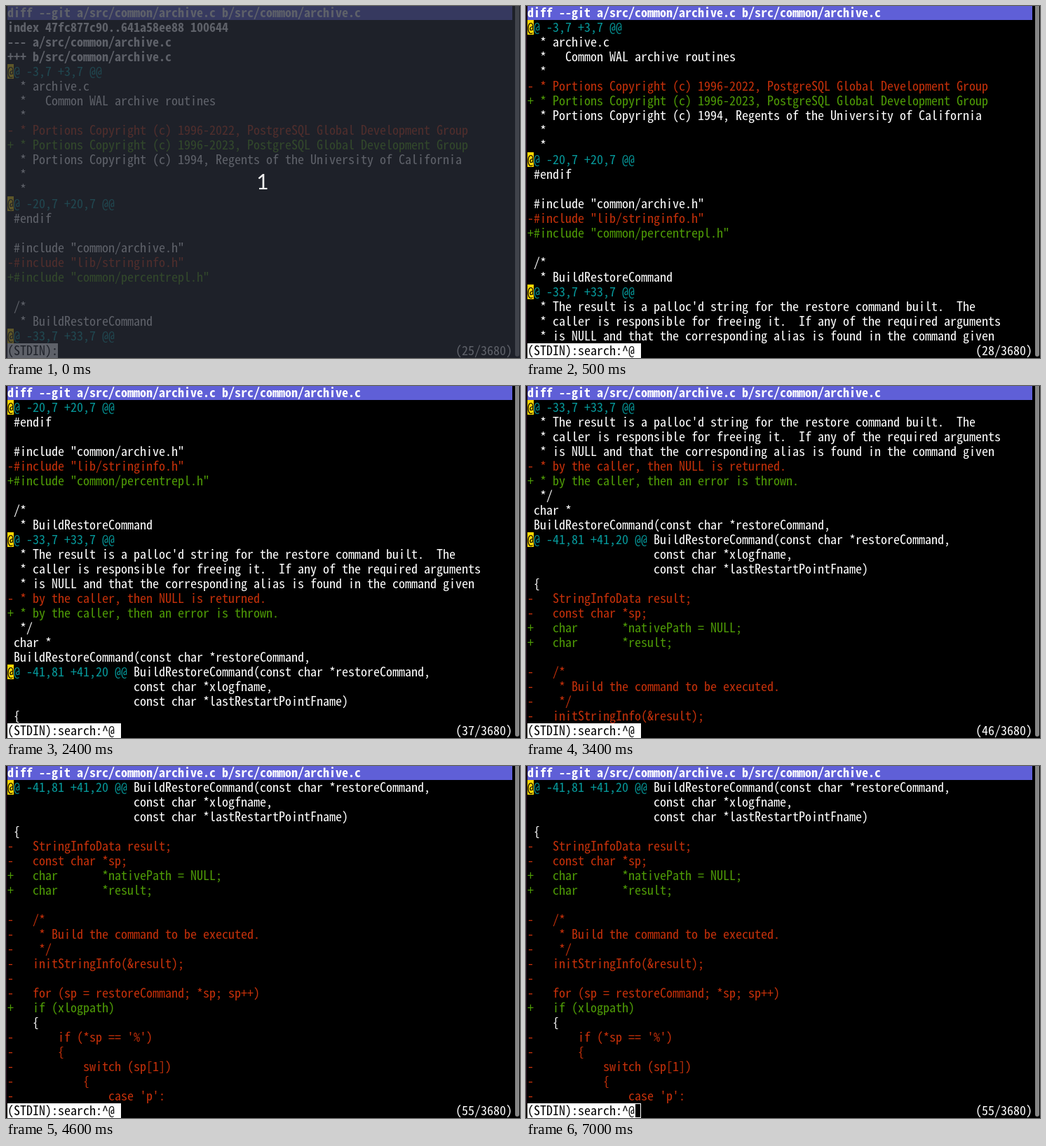
Write an HTML page that moves like this. It is 733 px wide and 503 px high and loops after 7.1 s.

```html
<!DOCTYPE html>
<html lang="en">
<head>
<meta charset="utf-8">
<title>Diff pager</title>
<style>
  html, body { margin: 0; width: 100%; height: 100%; overflow: hidden; background: #000; }
  svg { display: block; width: 733px; height: 503px; }
  text {
    font-family: "Noto Sans Mono CJK JP", "Noto Sans Mono", "DejaVu Sans Mono", monospace;
    white-space: pre;
    font-kerning: none;
    font-variant-ligatures: none;
  }
  .count { font: 30px Lato, "Open Sans", sans-serif; text-anchor: middle; }
</style>
</head>
<body>
<svg id="stage" viewBox="0 0 733 503"></svg>
<script>
const LOOP = 7100, CELL = 9, ROW = 21, LEFT = 2, COLS = 80, ROWS = 22;
const WHITE = "#fff", RED = "#c4300a", GREEN = "#4e9a06", CYAN = "#06989a";
const stage = document.getElementById("stage");

const HEADER = "diff --git a/src/common/archive.c b/src/common/archive.c";
const LINES = `index 47fc877c90..641a58ee88 100644
--- a/src/common/archive.c
+++ b/src/common/archive.c
@@ -3,7 +3,7 @@
  * archive.c
  *   Common WAL archive routines
  *
- * Portions Copyright (c) 1996-2022, PostgreSQL Global Development Group
+ * Portions Copyright (c) 1996-2023, PostgreSQL Global Development Group
  * Portions Copyright (c) 1994, Regents of the University of California
  *
  *
@@ -20,7 +20,7 @@
 #endif

 #include "common/archive.h"
-#include "lib/stringinfo.h"
+#include "common/percentrepl.h"

 /*
  * BuildRestoreCommand
@@ -33,7 +33,7 @@
  * The result is a palloc'd string for the restore command built.  The
  * caller is responsible for freeing it.  If any of the required arguments
  * is NULL and that the corresponding alias is found in the command given
- * by the caller, then NULL is returned.
+ * by the caller, then an error is thrown.
  */
 char *
 BuildRestoreCommand(const char *restoreCommand,
@@ -41,81 +41,20 @@ BuildRestoreCommand(const char *restoreCommand,
                    const char *xlogfname,
                    const char *lastRestartPointFname)
 {
-   StringInfoData result;
-   const char *sp;
+   char       *nativePath = NULL;
+   char       *result;

-   /*
-    * Build the command to be executed.
-    */
-   initStringInfo(&result);
-
-   for (sp = restoreCommand; *sp; sp++)
+   if (xlogpath)
    {
-       if (*sp == '%')
-       {
-           switch (sp[1])
-           {
-               case 'p':`.split("\n");

// [start ms, first line, cursor, countdown]
const STEPS = [
  [0, 0, "off", "1"],
  [100, 0, "off"],
  [500, 3, "on"],
  [1100, 3, "off"],
  [1700, 3, "on"],
  [2400, 12, "on"],
  [2900, 12, "off"],
  [3400, 21, "on"],
  [4000, 21, "off"],
  [4600, 30, "on"],
  [5200, 30, "off"],
  [5800, 30, "on"],
  [6400, 30, "off"],
  [6900, 30, "hollow"]
];

function add(tag, attrs, content = "") {
  const node = document.createElementNS("http://www.w3.org/2000/svg", tag);
  for (const key in attrs) node.setAttribute(key, attrs[key]);
  node.textContent = content;
  stage.append(node);
}

function rect(x, y, width, height, fill, more = {}) {
  add("rect", { x, y, width, height, fill, ...more });
}

// Choose the size at which one character fills one cell.
function cellFontSize() {
  const pen = document.createElement("canvas").getContext("2d");
  pen.font = "100px " + getComputedStyle(probe).fontFamily;
  return CELL * 100 / pen.measureText("0").width;
}
add("text", {});
const probe = stage.firstChild;
const fontSize = cellFontSize();

const colX = col => LEFT + col * CELL;
const rowY = row => row * ROW - 1;

function print(row, col, content, fill, weight = 400) {
  add("text", {
    x: colX(col), y: rowY(row) + 17, fill,
    "font-size": fontSize, "font-weight": weight
  }, content);
}

function block(row, col, count, fill) {
  rect(colX(col), rowY(row), count * CELL, ROW, fill);
}

function printLine(row, line) {
  if (line.startsWith("@@")) {
    const end = line.lastIndexOf("@@") + 2;
    block(row, 0, 1, "#ffd700");
    print(row, 0, "@", "#000");
    print(row, 1, line.slice(1, end), CYAN);
    print(row, end, line.slice(end), WHITE);
  } else if (/^(index|---|\+\+\+) /.test(line)) {
    print(row, 0, line, WHITE, 700);
  } else {
    print(row, 0, line, { "-": RED, "+": GREEN }[line[0]] || WHITE);
  }
}

function printStatus(first, cursor) {
  const row = ROWS + 1;
  const prompt = first ? "(STDIN):search:^@" : "(STDIN):";
  const position = `(${25 + first}/3680)`;
  block(row, 0, prompt.length, WHITE);
  print(row, 0, prompt, "#000");
  print(row, COLS - position.length, position, WHITE);
  if (cursor === "on") block(row, prompt.length, 1, WHITE);
  if (cursor === "hollow") {
    rect(colX(prompt.length) + .5, rowY(row) + .5, CELL - 1, ROW - 1, "none", { stroke: WHITE });
  }
}

function draw([, first, cursor, countdown]) {
  stage.replaceChildren();
  rect(0, 0, 733, 503, "#000");
  rect(0, 0, 1, 503, "#2c0f24");
  rect(726, -8, 6, 509, "#868686", { rx: 3 });
  block(0, 0, COLS, "#5f5fd7");
  print(0, 0, HEADER, WHITE, 700);
  LINES.slice(first, first + ROWS).forEach((line, i) => printLine(i + 1, line));
  printStatus(first, cursor);
  if (countdown) {
    rect(0, 0, 733, 503, "rgba(41,45,55,.75)");
    add("text", { class: "count", x: 366, y: 262, fill: "#eee" }, countdown);
  }
}

let shown;
const origin = performance.now();
function tick() {
  const time = (performance.now() - origin) % LOOP;
  const step = STEPS.findLast(([start]) => start <= time);
  if (step !== shown) draw(shown = step);
  requestAnimationFrame(tick);
}
tick();
</script>
</body>
</html>
```
